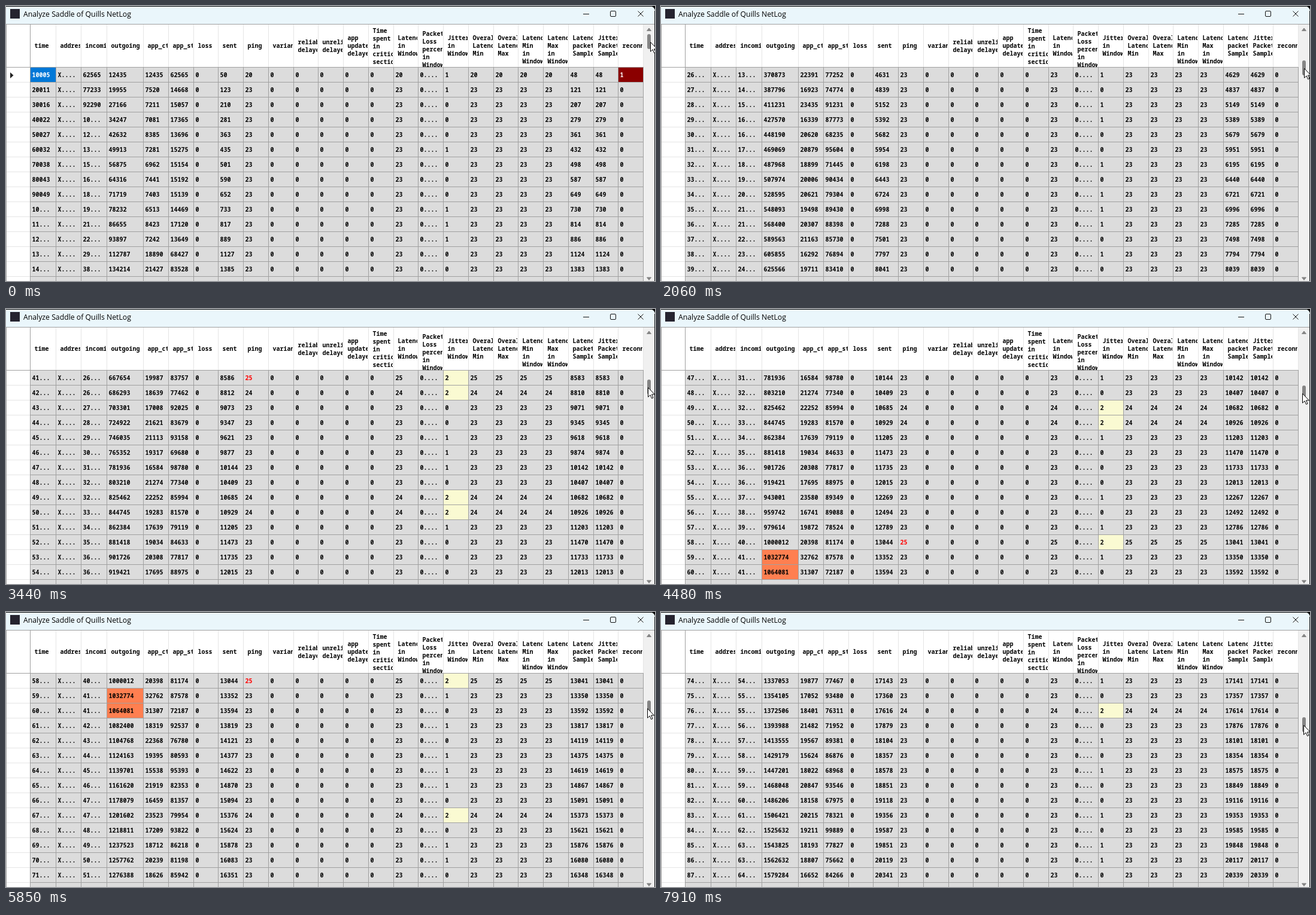
These frames come from a looping animation (1084 by 460 pixels, 8 s). An HTML page:

```html
<!DOCTYPE html>
<html lang="en">
<head>
<meta charset="utf-8">
<title>NetLog table</title>
<style>
  html, body { margin: 0; width: 100%; height: 100%; overflow: hidden; background: #fff; }
  svg { display: block; }
  text { font: 600 10px "Noto Sans Mono", "DejaVu Sans Mono", monospace; }
  .title { font: 400 12.25px "Open Sans", "Noto Sans", sans-serif; }
</style>
</head>
<body>
<svg id="stage" width="1084" height="460" viewBox="0 0 1084 460"></svg>
<script>
const NS = "http://www.w3.org/2000/svg";
const stage = document.getElementById("stage");

function add(parent, tag, attrs, text) {
  const el = document.createElementNS(NS, tag);
  for (const key in attrs) el.setAttribute(key, attrs[key]);
  if (text !== undefined) el.textContent = text;
  parent.appendChild(el);
  return el;
}
const rect = (x, y, width, height, fill, more) =>
  add(stage, "rect", { x, y, width, height, fill, ...more });
const path = (d, more) => add(stage, "path", { d, ...more });

// Linear interpolation between key points [position, value, value, ...]
function between(keys, at) {
  const k = Math.max(1, keys.findIndex(key => key[0] >= at));
  const a = keys[k - 1], b = keys[k], u = (at - a[0]) / (b[0] - a[0]);
  return a.map((v, i) => v + (b[i] - v) * u);
}

// Repeatable noise in 0..1 for a row and a channel
function noise(row, channel) {
  const v = Math.sin(row * 12.9898 + channel * 78.233) * 43758.5453;
  return v - Math.floor(v);
}

// Scroll: [step, first visible row, pointer x]
const LOOP = 8000, STEP = 343.9, LEAD = 4;
const SCROLL = [[0, 1, 1076], [2, 8, 1076], [4, 16, 1075], [7, 31, 1073], [8, 35, 1073],
  [10, 41, 1072], [13, 47, 1071], [15, 52, 1069], [19, 64, 1072], [23, 74, 1073]];

// Running totals: [row, outgoing, incoming, sent]
const TOTALS = [[0, 0, 0, 0], [1, 12435, 62565, 50], [12, 93897, 229349, 889],
  [16, 171290, 524480, 1935], [35, 548093, 2107246, 6998], [58, 1000012, 4037541, 13044],
  [60, 1064081, 4197306, 13594], [72, 1295956, 5214770, 16614],
  [73, 1317176, 5338770, 16870], [88, 1599800, 6559000, 20590]];
const SPIKES = [16, 23, 41, 42, 49, 50, 58, 67, 76];
const HIGH = [41, 58];
const ROWS = 88;

const short = n => n > 99999 ? String(n).slice(0, 2) + "..." : String(n);

// Key rows are exact; rows between them wander around the trend
function totals(n) {
  const now = between(TOTALS, n);
  if (TOTALS.some(key => key[0] === n)) return now;
  const before = between(TOTALS, n - 1);
  return now.map((v, i) => Math.round(v + (v - before[i]) * 0.24 * (noise(n, i) - 0.5)));
}

function makeRow(n) {
  const [, outgoing, incoming, sent] = totals(n), last = totals(n - 1);
  const out = outgoing - last[1], got = incoming - last[2];
  const spike = SPIKES.includes(n);
  const ping = n === 1 ? 20 : HIGH.includes(n) ? 25 : spike ? 24 : 23;
  const jitter = spike ? 2 : Math.round(noise(n, 4));
  const samples = sent - 2 - Math.round(noise(n, 5));
  const time = n < 10 ? Math.round(n * 10005.4) : n + "...";
  const values = [time, "X....", short(incoming), outgoing, out, short(got), 0, sent, ping,
    0, 0, 0, 0, 0, ping, "0....", jitter, ping, ping, ping, ping, samples, samples, +(n === 1)];
  const fills = {}, inks = {};
  if (got > 115000) fills[2] = "#ff7f50";
  if (out > 25000) fills[3] = "#ff7f50";
  if (spike) fills[16] = "#fafad2";
  if (ping > 24) inks[8] = "#f00";
  if (n === 1) {
    fills[0] = "#0078d7";
    fills[23] = "#8b0000";
    inks[0] = inks[23] = "#fff";
  }
  return { values, fills, inks };
}
const rows = Array.from({ length: ROWS }, (_, i) => makeRow(i + 1));

const HEADS = ["time", "address", "incoming", "outgoing", "app_ctos", "app_stoc", "loss", "sent",
  "ping", "variance", "reliable delayed", "unreliable delayed", "app updates delayed",
  "Time spent in critical section", "Latency in Window", "Packet Loss percentage in Window",
  "Jitter in Window", "Overall Latency Min", "Overall Latency Max", "Latency Min in Window",
  "Latency Max in Window", "Latency packets Samples", "Jitter Packet Samples", "reconnect"];
const HEAD_TOP = { 1: 70, 2: 64, 3: 57, 4: 57, 5: 45 };
const EDGES = Array.from({ length: HEADS.length + 1 }, (_, i) =>
  Math.round(i < 4 ? 40 + i * 128 / 3 : 229 + (i - 4) * 41.75));
const TOP = 103, PITCH = 25, SHOWN = 15;
const GRID = "#a0a0a0", PALE = "#e5e5e5", CELL = "#dcdcdc", BAR = "#858585";

// Window frame and title bar
rect(0, 0, 1084, 460, "#fff");
rect(0, 0, 1083, 30, "#eaf6fb");
rect(0, 0, 1084, 1, "#000");
path("M1076 0H1084V8Q1083 1 1076 0Z", { fill: "#000" });
rect(7, 5, 16, 16, "#25232f");
add(stage, "text", { x: 29, y: 18, class: "title", fill: "#000" }, "Analyze Saddle of Quills NetLog");
const thin = { fill: "none", stroke: "#111" };
path("M964 13.5H974", thin);
rect(1009.5, 8.5, 9, 9, "none", { stroke: "#111", rx: 1.5 });
path("M1055.5 8.5L1064.5 17.5M1064.5 8.5L1055.5 17.5", thin);
rect(0, 30, 1083, 1, GRID);
rect(0, 30, 1, 430, GRID);

// Column headers
HEADS.forEach((head, c) => {
  const x = EDGES[c], width = EDGES[c + 1] - x - 1, words = head.split(" ");
  const box = add(stage, "svg", { x, y: 31, width, height: 71,
    viewBox: `${x} 31 ${width} 71`, overflow: "hidden" });
  const top = words[0] === "Packet" ? 50 : HEAD_TOP[words.length];
  words.forEach((word, k) => add(box, "text", { x: x + 7.5, y: top + k * 13 }, word));
});
EDGES.forEach((x, i) => rect(x, 31, 1, 71, i ? PALE : GRID));

// Table body
const cells = [];
for (let r = 0; r < SHOWN; r++) {
  const y = TOP + r * PITCH;
  cells.push(HEADS.map((_, c) => ({
    back: rect(EDGES[c] + 1, y, EDGES[c + 1] - EDGES[c] - 1, PITCH - 1, CELL),
    label: add(stage, "text", { x: EDGES[c] + 3.5, y: y + 16 })
  })));
}
for (let r = 0; r <= SHOWN; r++) {
  const y = TOP - 1 + r * PITCH;
  rect(1, y, 39, 1, r ? PALE : GRID);
  rect(40, y, 1025, 1, GRID);
}
EDGES.forEach(x => rect(x, 102, 1, 358, GRID));
const marker = path("M7 111L12.5 116L7 121Z", { fill: "#222" });

// Scroll bar and pointer
rect(1065, 31, 18, 429, "#f0f0f0");
const arrow = { fill: BAR, stroke: BAR, "stroke-linejoin": "round" };
path("M1070.5 41.5L1074 37L1077.5 41.5Z", arrow);
path("M1070.5 454L1074 458.5L1077.5 454Z", arrow);
const thumb = rect(1071, 47, 6, 25, BAR, { rx: 3 });
rect(1083, 8, 1, 452, "#15181a");
const pointer = path("M.5 .5V16.2L4.1 12.8L6.6 18.5L9 17.4L6.5 11.9H11.4Z",
  { fill: "#fff", stroke: "#000", "stroke-linejoin": "round" });

let shown = -1;
function show(step) {
  if (step === shown) return;
  shown = step;
  const [, place, x] = between(SCROLL, step);
  const first = Math.round(place);
  cells.forEach((line, r) => {
    const { values, fills, inks } = rows[first - 1 + r];
    line.forEach(({ back, label }, c) => {
      back.setAttribute("fill", fills[c] || CELL);
      label.setAttribute("fill", inks[c] || "#000");
      label.textContent = values[c];
    });
  });
  marker.setAttribute("visibility", first === 1 ? "visible" : "hidden");
  const top = Math.round(47.4 + 1.76 * (first - 1));
  thumb.setAttribute("y", top);
  pointer.setAttribute("transform", `translate(${Math.round(x)} ${top + 13})`);
}

const began = performance.now();
function tick() {
  const t = (performance.now() - began) % LOOP;
  show(Math.floor((t + LEAD) / STEP));
  requestAnimationFrame(tick);
}
tick();
</script>
</body>
</html>
```
